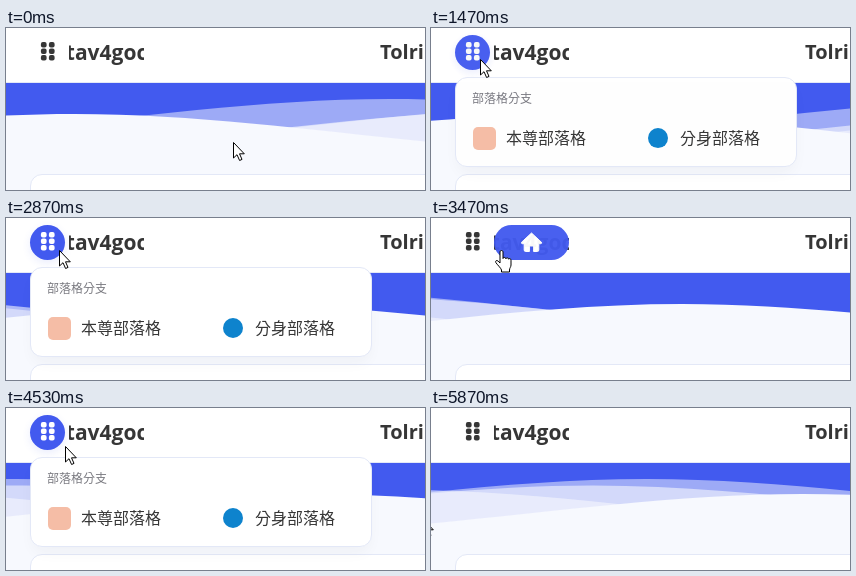
Write an HTML page that moves like this. It is 419 px wide and 162 px high and loops after 5940 ms.

```html
<!DOCTYPE html>
<html lang="zh-Hant">
<head>
<meta charset="utf-8">
<style>
html, body { margin: 0; width: 100%; height: 100%; overflow: hidden; }
body { position: relative; background: #f7f9fe; color: #363636;
  font-family: "Open Sans", "Noto Sans", sans-serif; }
body > * , .menu > * { position: absolute; box-sizing: border-box; white-space: nowrap; }
#waves, #pointer { left: 0; top: 0; width: 419px; height: 162px; }
.header { left: 0; top: 0; width: 419px; height: 55px; background: #fff; border-bottom: 1px solid #e3e8f7; }
.title { left: 374px; top: 10px; font: bold 20px/28px "Open Sans", "Noto Sans", sans-serif; }
.logo { left: 63px; top: 7px; width: 75px; height: 35px; overflow: hidden;
  display: flex; justify-content: center; font: bold 21px/34px "Open Sans", "Noto Sans", sans-serif; }
.logo span { flex: none; }
.pill { left: 63px; top: 7px; width: 75px; height: 35px; border-radius: 18px; background: #425aef; }
.circle { left: 24px; top: 7px; width: 35px; height: 35px; border-radius: 50%;
  background: #425aef; box-shadow: 0 3px 8px #425aef1c; }
.grip { left: 34px; top: 13px; width: 16px; height: 20px; }
.card { left: 24px; top: 146px; width: 882px; height: 80px; background: #fff;
  border: 1px solid #e3e8f7; border-radius: 12px; }
.menu { left: 24px; top: 49px; width: 342px; height: 90px; background: #fff;
  border: 1px solid #e3e8f7; border-radius: 12px; box-shadow: 0 8px 16px -4px #2c2d300c;
  font-family: "Noto Sans CJK TC", "Noto Sans CJK", sans-serif; }
.head { left: 16px; top: 11px; font-size: 12px; line-height: 18px; }
.item { top: 47px; font-size: 16px; line-height: 24px; }
.avatar { left: 17px; top: 49px; width: 23px; height: 23px; border-radius: 5px; background: #f5bda6; }
.badge { left: 192px; top: 50px; width: 20px; height: 20px; border-radius: 50%; background: #0e83cd; }
</style>
</head>
<body>
<svg id="waves" viewBox="0 0 419 162">
  <rect y="54" width="419" height="72.7" fill="#425aef"/>
  <g id="layers" fill="#f7f9fe"></g>
</svg>
<div class="card"></div>
<div class="header"></div>
<div class="title">Tolri</div>
<div class="logo"><span>tav4goc</span></div>
<div class="pill" id="pill">
  <svg width="75" height="35"><path fill="#fff" d="M37.5 8L27.5 17.3Q27 18.5 28.3 18.7H30.2V25Q30.2 26.5 31.7 26.5H35.4V21H39.6V26.5H43.3Q44.8 26.5 44.8 25V18.7H46.7Q48 18.5 47.5 17.3Z" stroke="#fff" stroke-linejoin="round"/></svg>
</div>
<div class="circle" id="circle"></div>
<svg class="grip" id="grip" viewBox="0 0 16 20"></svg>
<div class="menu" id="menu">
  <span class="head" id="head">部落格分支</span>
  <i class="avatar"></i><span class="item" style="left:50px">本尊部落格</span>
  <i class="badge"></i><span class="item" style="left:224px">分身部落格</span>
</div>
<svg id="pointer" viewBox="0 0 419 162" fill="#fff" stroke="#000" stroke-linejoin="round">
  <path id="arrow" d="M.5 .5V16L4 12.7L6.6 18.5L9 17.4L6.5 11.8H11.3Z"/>
  <path id="hand" d="M5 1.8C5 .1 8 .1 8 1.8V8.5C8 7 10.8 7.1 10.9 8.7C11.2 7.4 13.5 7.5 13.6 9.2C14 8.2 16 8.4 16 10.2V15C16 17 14.5 18 14.5 20V22H6.5V20C6 18 2 14.5 .8 12.5C-.1 10.9 1.8 9.8 3.1 11.1L5 13Z"/>
</svg>
<script>
const LOOP = 5940, STEPS = 89;
const $ = id => document.getElementById(id);
const clamp = v => Math.min(1, Math.max(0, v));
const mix = (a, b, p) => a + (b - a) * p;

function bezier(x1, y1, x2, y2) {
  const at = (a, b, s) => 3 * a * s * (1 - s) ** 2 + 3 * b * s * s * (1 - s) + s ** 3;
  return x => {
    let lo = 0, hi = 1;
    for (let i = 0; i < 24; i++) {
      const mid = (lo + hi) / 2;
      if (at(x1, x2, mid) < x) lo = mid; else hi = mid;
    }
    return at(y1, y2, lo);
  };
}
const drift = bezier(.55, .5, .45, .5);
const ease = bezier(.25, .1, .25, 1);

// Waves: vertical offset, head start (s), period (s), opacity
const WAVES = [[0, 2, 7, .5], [3, 3, 10, .6], [5, 4, 13, .6], [7, 5, 20, 1]];
const AGE = 89, UNIT_X = 6.2, UNIT_Y = 60 / 28, WAVE_TOP = 66.7;
const CURVE = "M-160 44c30 0 58-18 88-18s58 18 88 18 58-18 88-18 58 18 88 18v44h-352z";
const layers = WAVES.map(([, , , alpha]) => {
  const path = document.createElementNS("http://www.w3.org/2000/svg", "path");
  path.setAttribute("d", CURVE);
  path.setAttribute("opacity", alpha);
  $("layers").append(path);
  return path;
});

$("grip").innerHTML = [0, 1, 2].flatMap(r => [0, 1].map(c =>
  `<rect x="${.9 + c * 8}" y="${.9 + r * 6.5}" width="5.7" height="5.5" rx="2"/>`)).join("");

// Hover spans in ms
const LOGO = [[610, 1235], [1740, 2450], [3290, 3800]];
const GRIP = [[1240, 1735], [2455, 3285], [3900, 5610]];
const PANEL = [[4600, 5610]];

// Pointer path: time, x, y
const PATH = [
  [0, 228, 114], [130, 221, 111], [300, 165, 84], [480, 104, 53], [600, 79, 42], [730, 70, 33],
  [1050, 73, 31], [1200, 67, 31], [1300, 52, 31], [1470, 50, 31], [1670, 55, 31], [1800, 70, 31],
  [2330, 69, 32], [2470, 57, 32], [2870, 54, 32], [3200, 56, 32], [3350, 70, 32],
  [3730, 70, 32], [3900, 58, 31], [4000, 57, 31], [4300, 58, 33], [4600, 61, 40],
  [5200, 65, 42], [5400, 63, 46], [5600, 30, 72], [5870, -8, 110]
];

const inside = (spans, t) => spans.some(([a, b]) => t >= a && t < b);

function hover(spans, t, rise, fall) {
  let level = 0;
  for (const [a, b] of spans) {
    if (t >= a && t < b) level = ease(clamp((t - a) / rise));
    else if (t >= b && fall) level = Math.max(level, 1 - ease(clamp((t - b) / fall)));
  }
  return level;
}

function pointerAt(t) {
  const i = Math.max(1, PATH.findIndex(p => p[0] >= t));
  const [a, b] = [PATH[i - 1], PATH[i]];
  const p = clamp((t - a[0]) / (b[0] - a[0]));
  return [mix(a[1], b[1], p), mix(a[2], b[2], p)];
}

const blend = (a, b, p) => `rgb(${a.map((v, i) => Math.round(mix(v, b[i], p)))})`;
const BLUE = [66, 90, 239];

function draw(t) {
  WAVES.forEach(([y, lead, period], i) => {
    const phase = (AGE + lead + t / 1000) / period % 1;
    const x = 48 + mix(-90, 85, drift(phase));
    layers[i].setAttribute("transform",
      `translate(${x * UNIT_X} ${WAVE_TOP + (y - 24) * UNIT_Y}) scale(${UNIT_X} ${UNIT_Y})`);
  });

  $("pill").style.opacity = hover(LOGO, t, 240, 150);
  const ring = hover(GRIP, t, 300, 130);
  $("circle").style.opacity = ring;
  $("grip").style.fill = blend([54, 54, 54], [255, 255, 255], ring);

  const shown = hover(GRIP, t, 255, 0);
  $("menu").style.opacity = shown;
  $("menu").style.transform = `translateY(${10 * (1 - shown)}px)`;
  const lit = hover(PANEL, t, 300, 0);
  $("menu").style.borderColor = blend([227, 232, 247], BLUE, lit);
  $("head").style.color = blend([122, 122, 128], BLUE, lit);

  const [x, y] = pointerAt(t).map(Math.round);
  const onLink = inside(LOGO, t);
  $("arrow").style.display = onLink ? "none" : "";
  $("hand").style.display = onLink ? "" : "none";
  $("arrow").setAttribute("transform", `translate(${x - 1} ${y})`);
  $("hand").setAttribute("transform", `translate(${x - 6} ${y})`);
}

// Fifteen steps per second, on a 10 ms grid
const startOf = k => 10 * Math.round(k * 20 / 3);
const origin = performance.now();

function tick() {
  const t = (performance.now() - origin) % LOOP;
  let k = Math.floor(t * 3 / 200);
  if (startOf(k) > t) k--;
  else if (startOf(k + 1) <= t) k++;
  draw(startOf(Math.min(k, STEPS - 1)));
  requestAnimationFrame(tick);
}
tick();
</script>
</body>
</html>
```
